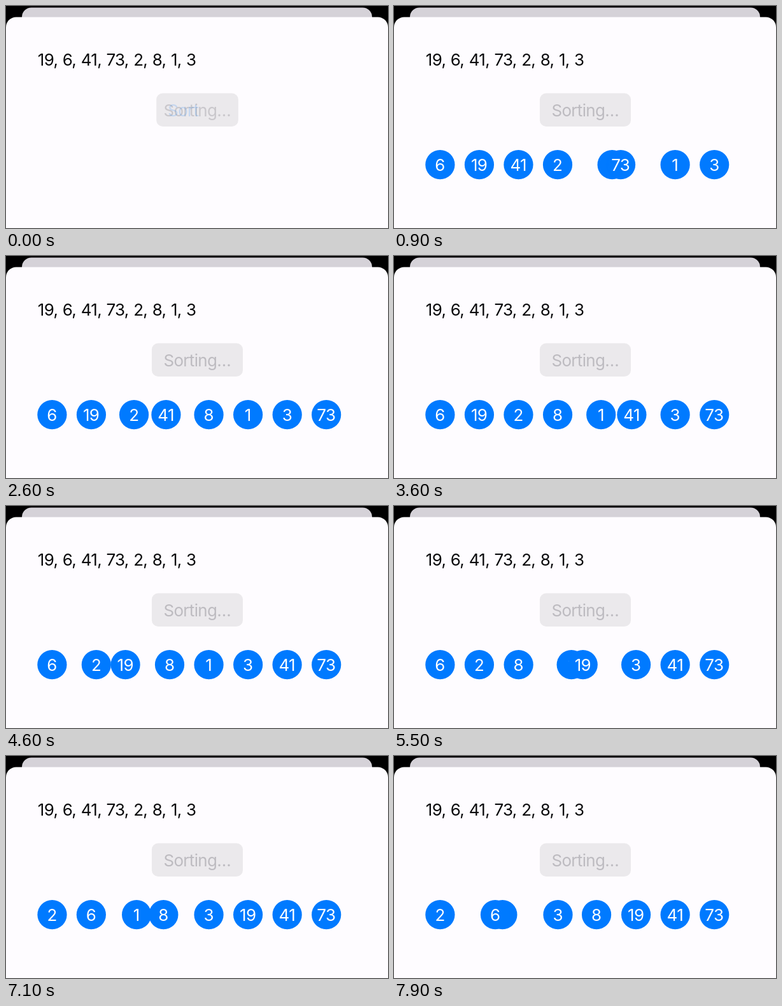
An HTML page with a canvas for the animation above (8000 ms loop, 600 px wide and 350 px high).

```html
<!DOCTYPE html>
<html lang="en">
<head>
<meta charset="utf-8">
<title>Bubble sort</title>
<style>
  html, body { margin: 0; width: 100%; height: 100%; overflow: hidden; background: #000; }
  canvas { display: block; }
</style>
</head>
<body>
<canvas id="stage" width="600" height="350"></canvas>
<script>
const ctx = document.getElementById('stage').getContext('2d');
const LOOP = 8000, STEP = 100;
const BLUE = '#007aff', PAPER = '#fefcff';
const TRACKING = -0.7;
const values = [19, 6, 41, 73, 2, 8, 1, 3];
const TAP = -235, REVEAL = 210;

// Critically damped spring, 0 to 1, with a 0.55 s response.
function spring(ms) {
  if (ms <= 0) return 0;
  const w = ms / 1000 * 2 * Math.PI / 0.55;
  return 1 - (1 + w) * Math.exp(-w);
}

// The first two swaps happen before the circles are shown.
function swapTime(n) {
  if (n < 2) return -1e6;
  const k = n - 2;
  return 720 + 509.6 * Math.min(k, 11) + 484 * Math.max(0, k - 11);
}

function bubbleSwaps(list) {
  const a = list.slice(), swaps = [];
  for (let end = a.length - 1; end > 0; end--) {
    for (let i = 0; i < end; i++) {
      if (a[i] > a[i + 1]) {
        [a[i], a[i + 1]] = [a[i + 1], a[i]];
        swaps.push({ slot: i, at: swapTime(swaps.length) });
      }
    }
  }
  return swaps;
}
const swaps = bubbleSwaps(values);

function box(x, y, w, h, r, fill) {
  ctx.fillStyle = fill;
  ctx.beginPath();
  ctx.roundRect(x, y, w, h, r);
  ctx.fill();
}

function text(str, x, y, fill, align = 'left') {
  ctx.fillStyle = fill;
  ctx.textAlign = align;
  ctx.fillText(str, align === 'center' ? x + TRACKING / 2 : x, y);
}

function drawButton(t) {
  const p = spring(t - TAP);
  const w = 86 + 57 * p;
  box(300.5 - w / 2, 137.5, w, 52.5, 10, '#ebe9ec');
  ctx.globalAlpha = p;
  text('Sorting…', 247.5, 173.5, '#bdbbc0');
  ctx.globalAlpha = 0.65 * (1 - p);
  text('Sort', 274 - 26.5 * p, 173.5, BLUE);
  ctx.globalAlpha = 1;
}

function drawCircles(t) {
  const order = values.map((value, i) => ({ value, pos: i }));
  for (const { slot, at } of swaps) {
    if (t < at) break;
    const p = spring(t - at);
    const left = order[slot], right = order[slot + 1];
    left.pos += p;
    right.pos -= p;
    order[slot] = right;
    order[slot + 1] = left;
  }
  ctx.globalAlpha = spring(t - REVEAL);
  for (const { value, pos } of order) {
    const x = 72.4 + 61.54 * pos;
    ctx.fillStyle = BLUE;
    ctx.beginPath();
    ctx.arc(x, 250.2, 23.1, 0, 2 * Math.PI);
    ctx.fill();
    text(value, x, 259.7, '#fff', 'center');
  }
  ctx.globalAlpha = 1;
}

function draw(t) {
  ctx.fillStyle = '#000';
  ctx.fillRect(0, 0, 600, 350);
  box(25, 2.4, 550, 40, 15, '#d5d2d8');
  box(0, 17.4, 600, 360, 16, PAPER);
  ctx.font = '400 26px Inter, "Liberation Sans", sans-serif';
  ctx.letterSpacing = TRACKING + 'px';
  ctx.wordSpacing = '0.95px';
  text(values.join(', '), 49.8, 94, '#0a0a0c');
  drawButton(t);
  drawCircles(t);
}

const begin = performance.now();
function tick() {
  const t = Math.max(0, performance.now() - begin) % LOOP;
  draw(Math.floor(t / STEP) * STEP);
  requestAnimationFrame(tick);
}
tick();
</script>
</body>
</html>
```
